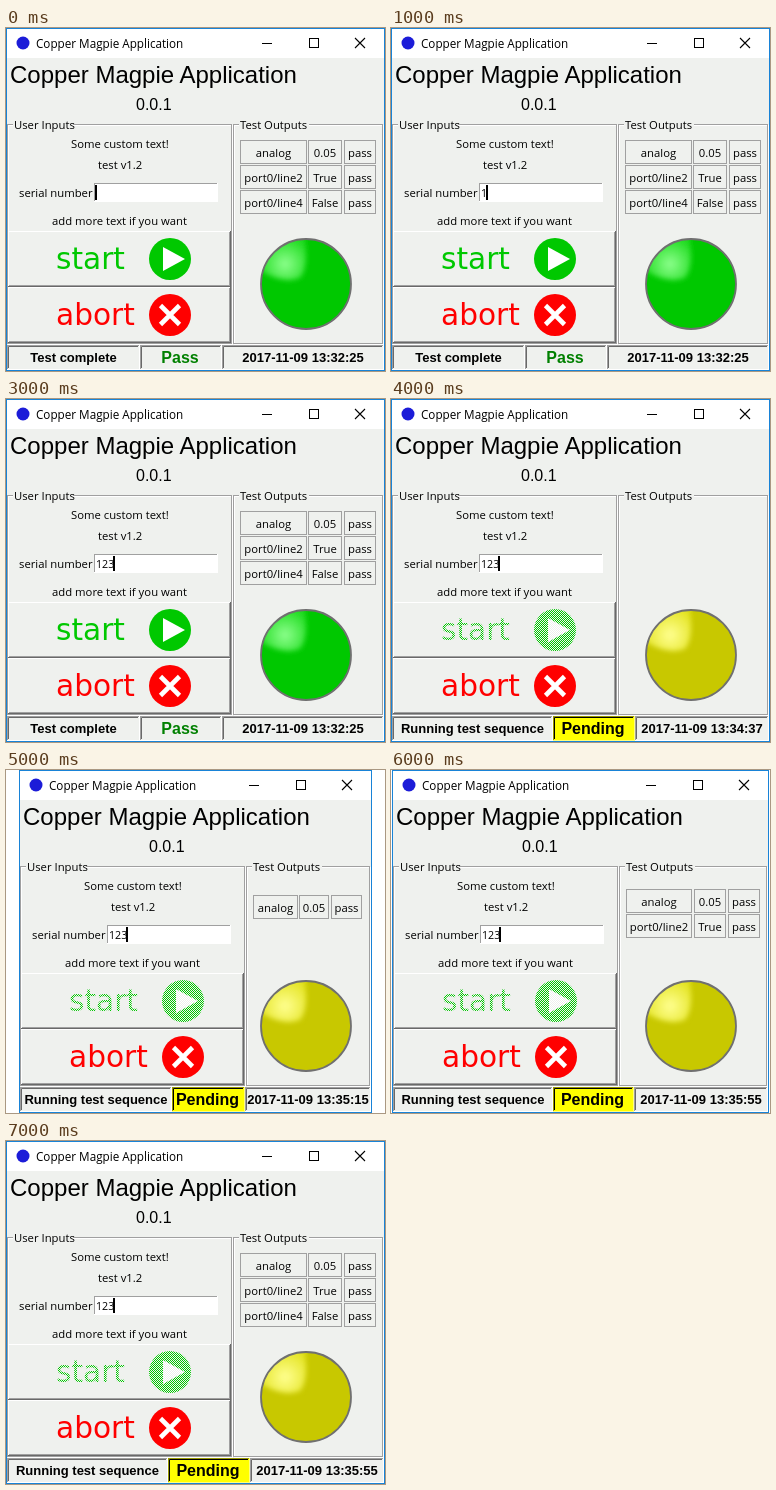
Write an HTML page that moves like this. It is 379 by 343 pixels and loops after 8000 ms.

```html
<!DOCTYPE html>
<html lang="en">
<head>
<meta charset="utf-8">
<title>Test window</title>
<style>
  html, body { margin: 0; width: 100%; height: 100%; overflow: hidden; background: #fff; }
  svg { display: block; width: 379px; height: 343px; }
  text { font-family: "Open Sans", "Noto Sans", sans-serif; font-size: 11.3px; white-space: pre; }
  .title { font-size: 11.7px; }
  .entry { font-size: 10.7px; }
  .head, .version, .status, .verdict { font-family: "Liberation Sans", Arial, sans-serif; }
  .head { font-size: 24px; }
  .version { font-size: 16px; }
  .status { font-size: 13px; font-weight: bold; }
  .verdict { font-size: 16px; font-weight: bold; }
  .button { font-family: "DejaVu Sans", Verdana, sans-serif; font-size: 29.6px; }
  .mid { text-anchor: middle; }
</style>
</head>
<body>
<svg viewBox="0 0 379 343">
  <defs>
    <pattern id="stipple" width="2" height="2" patternUnits="userSpaceOnUse">
      <path d="M0 0h1v1h-1zM1 1h1v1h-1z" fill="#eff1ee" shape-rendering="crispEdges"/>
    </pattern>
    <radialGradient id="green" gradientUnits="userSpaceOnUse" cx="279" cy="236" r="27">
      <stop offset="0" stop-color="#8cff8c"/>
      <stop offset="1" stop-color="#20dc20"/>
    </radialGradient>
    <radialGradient id="yellow" gradientUnits="userSpaceOnUse" cx="279" cy="236" r="27">
      <stop offset="0" stop-color="#ffff90"/>
      <stop offset="1" stop-color="#e4e424"/>
    </radialGradient>
    <filter id="soft"><feGaussianBlur stdDeviation="2.6"/></filter>
    <clipPath id="lamp"><circle cx="300" cy="256" r="45"/></clipPath>
  </defs>
  <g id="stage"></g>
</svg>
<script>
const APP = "Copper Magpie Application";
const FACE = "#eff1ee", SHADE = "#a0a0a0", DARK = "#696969";
const RESULTS = [["analog", "0.05", "pass"], ["port0/line2", "True", "pass"], ["port0/line4", "False", "pass"]];

// Layouts: window edges, output frame edges, status dividers, table columns and first row.
const WIDE = { left: 0, right: 379, frame: [227, 378], bar: [1, 134, 216, 378],
  cols: [[234, 301], [302, 336], [338, 370]], top: 112 };
const BUSY = { ...WIDE, bar: [1, 162, 244, 378] };
const NARROW = { left: 13, right: 366, frame: [240, 365], bar: [14, 166, 239, 365],
  cols: [[247, 292], [293, 323], [325, 356]], top: 125 };
const MEDIUM = { left: 1, right: 378, frame: [228, 377], bar: [2, 162, 243, 377],
  cols: [[235, 301], [303, 335], [337, 369]], top: 119 };

const idle = typed => ({ box: WIDE, typed, rows: 3, date: "2017-11-09 13:32:25" });
const running = (box, rows, time) =>
  ({ box, typed: "123", rows, busy: true, date: "2017-11-09 " + time });
const STEPS = [
  idle(""), idle("1"), idle("12"), idle("123"),
  running(BUSY, 0, "13:34:37"),
  running(NARROW, 1, "13:35:15"),
  running(MEDIUM, 2, "13:35:55"),
  running(BUSY, 3, "13:35:55")
];

const rect = (x, y, w, h, fill) => `<rect x="${x}" y="${y}" width="${w}" height="${h}" fill="${fill}"/>`;
const outline = (x, y, w, h, color) =>
  `<rect x="${x + .5}" y="${y + .5}" width="${w - 1}" height="${h - 1}" fill="none" stroke="${color}"/>`;
const path = (d, color, width = 1) => `<path d="${d}" fill="none" stroke="${color}" stroke-width="${width}"/>`;
const disc = (x, y, r, fill) => `<circle cx="${x}" cy="${y}" r="${r}" fill="${fill}"/>`;
const text = (x, y, value, style = "", fill = "#000") =>
  `<text x="${x}" y="${y}" class="${style}" fill="${fill}">${value}</text>`;

function bevel(x, y, w, h, upper, lower, fill = FACE) {
  return rect(x, y, w, h, lower) + rect(x, y, w - 1, h - 1, upper) +
    rect(x + 1, y + 1, w - 2, h - 2, fill);
}

function group(x, right, label, labelWidth) {
  const w = right - x;
  return outline(x + 1, 97, w - 1, 220, "#fff") + outline(x, 96, w - 1, 220, SHADE) +
    rect(x + 6, 94, labelWidth + 3, 8, FACE) + text(x + 7, 101, label);
}

function button(y, label, color, icon) {
  return rect(2, y, 223, 56, DARK) + rect(2, y, 222, 55, "#fff") +
    rect(3, y + 1, 221, 54, SHADE) + rect(3, y + 1, 220, 53, FACE) +
    text(50, y + 38, label, "button", color) + disc(164, y + 28, 21, color) + icon;
}

function inputs({ typed, busy }) {
  return text(4, 55, APP, "head") + text(130, 82, "0.0.1", "version") +
    group(1, 227, "User Inputs", 57) +
    text(65, 120, "Some custom text!") + text(92, 141, "test v1.2") +
    text(13, 169, "serial number") + text(46, 197, "add more text if you want") +
    bevel(88, 155, 124, 19, SHADE, "#fff", "#fff") +
    text(90, 169, typed, "entry") + rect(89 + 6 * typed.length, 157, 2, 15, "#000") +
    button(203, "start", "#00c800", `<path d="M157 219L179 231L157 243Z" fill="#fff"/>`) +
    (busy ? rect(46, 208, 144, 46, "url(#stipple)") : "") +
    button(259, "abort", "#ff0000", path("M154.5 277.5L173.5 296.5M173.5 277.5L154.5 296.5", "#fff", 4.6));
}

function titleBar({ left, right }) {
  return rect(left, 0, right - left, 343, FACE) + rect(left, 0, right - left, 30, "#fff") +
    disc(left + 17, 15, 6.5, "#1c1cd8") + text(left + 30, 20, APP, "title") +
    rect(right - 123, 15, 10, 1, "#000") + outline(right - 76, 10, 10, 10, "#000") +
    path(`M${right - 30} 10l10 10m0 -10l-10 10`, "#000", 1.1);
}

function lamp(base, glow) {
  return disc(300, 256, 45, base) +
    `<g clip-path="url(#lamp)"><path d="M252 241Q276 257 294 250Q304 238 298 206L270 206L250 226Z"
      fill="url(#${glow})" filter="url(#soft)"/></g>` +
    `<circle cx="300" cy="256" r="45" fill="none" stroke="#707070" stroke-width="1.8"/>`;
}

function outputs({ box, rows, busy }) {
  const cells = RESULTS.slice(0, rows).map((row, i) => row.map((value, j) => {
    const [x, end] = box.cols[j], y = box.top + 25 * i;
    return bevel(x, y, end - x, 24, SHADE, SHADE) + text((x + end) / 2, y + 17, value, "mid");
  }).join("")).join("");
  return group(box.frame[0], box.frame[1], "Test Outputs", 67) + cells +
    (busy ? lamp("#c8c800", "yellow") : lamp("#00c800", "green"));
}

function sunken(x, end, fill = FACE, upper = SHADE, inner = DARK, lower = "#fff") {
  return bevel(x, 317, end - x, 25, upper, lower, fill) + path(`M${x + 1.5} 340V318.5H${end - 2}`, inner);
}

function statusBar({ box, busy, date }) {
  const [a, b, c, d] = box.bar;
  const verdictCell = busy ? sunken(b, c, "#ff0", "#990", "#000", "#ffff7f") : sunken(b, c);
  return sunken(a, b) + verdictCell + sunken(c, d) +
    text((a + b) / 2, 334, busy ? "Running test sequence" : "Test complete", "status mid") +
    text((b + c) / 2 - 1, 335, busy ? "Pending" : "Pass", "verdict mid", busy ? "#000" : "#008000") +
    text((c + d) / 2, 334, date, "status mid");
}

function scene(step) {
  const { left, right } = step.box;
  return titleBar(step.box) + `<g transform="translate(${left})">${inputs(step)}</g>` +
    outputs(step) + statusBar(step) + outline(left, 0, right - left, 343, "#1883d7");
}

const stage = document.getElementById("stage");
const began = performance.now();
let shown = -1;

function tick() {
  const index = Math.floor((performance.now() - began) / 1000) % STEPS.length;
  if (index !== shown) {
    stage.innerHTML = scene(STEPS[index]);
    shown = index;
  }
  requestAnimationFrame(tick);
}
tick();
</script>
</body>
</html>
```
